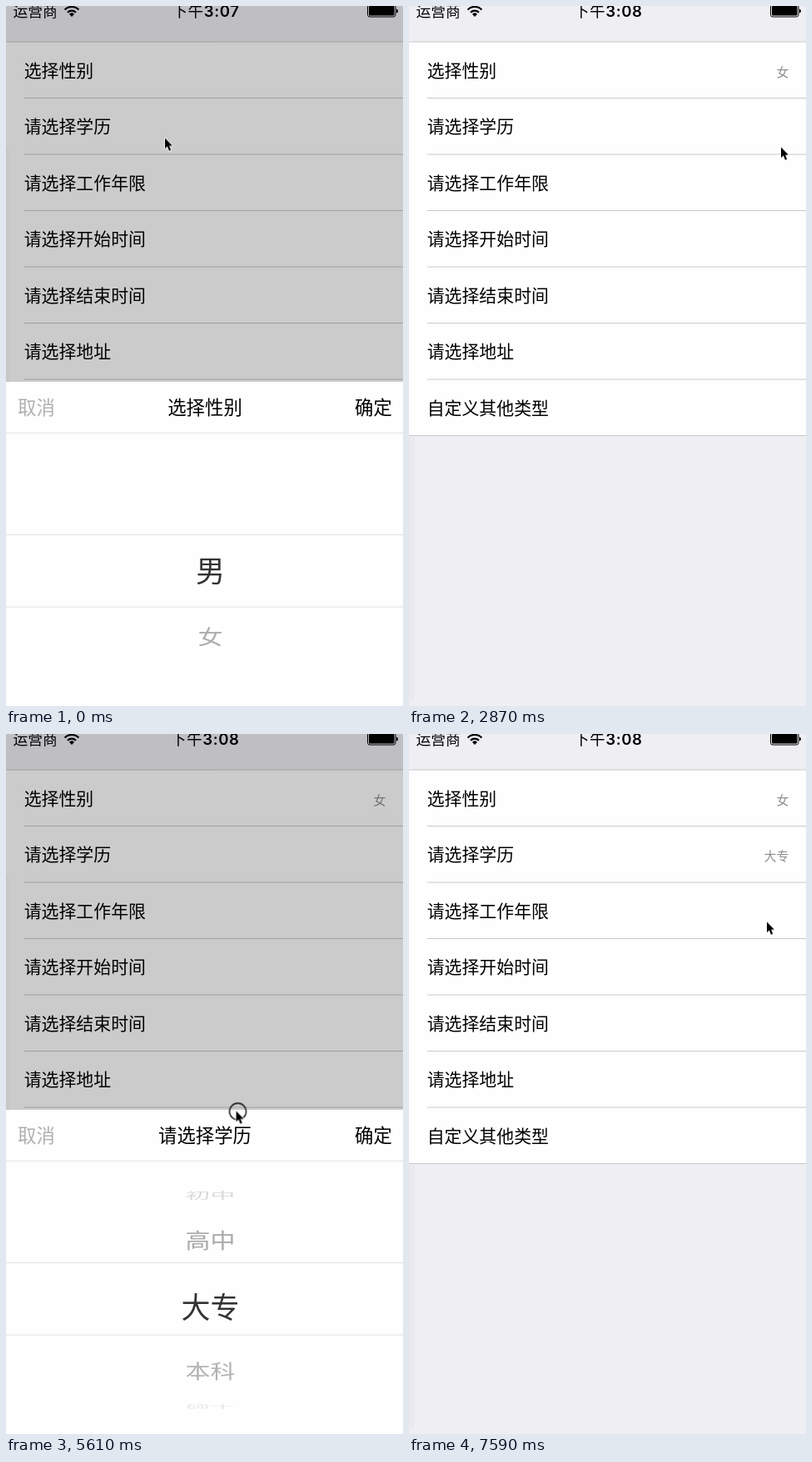
An HTML page that plays this animation: 477 by 840 pixels, repeating every 8 s.

```html
<!DOCTYPE html>
<html lang="zh-CN">
<head>
<meta charset="utf-8">
<title>选择器</title>
<style>
@property --scroll { syntax: "<number>"; inherits: true; initial-value: 0; }

html, body { margin: 0; width: 100%; height: 100%; overflow: hidden; background: #efeef3; }
svg { display: block; width: 100%; height: 100%; }
text { font-family: "Noto Sans CJK SC", "Noto Sans CJK", sans-serif; }
line { stroke: #c8c7cc; }
.status { font-size: 17.8px; }
.clock text { font: 600 18.6px Inter, "Noto Sans CJK SC", sans-serif; letter-spacing: .6px; text-anchor: end; }
.clock tspan { font-weight: 500; }
.row { font-size: 20.9px; }
.value { font-size: 15px; fill: #8e8e93; text-anchor: end; }
.bar { font-size: 22.4px; }
.title { text-anchor: middle; }
.sheet line { stroke: #e2e2e2; }

/* Wheel items sit on a cylinder; --scroll is the index facing the viewer. */
.item {
  --angle: calc((var(--i) - var(--scroll)) * 36.5deg);
  transform: translateY(calc(133px * sin(var(--angle)))) scaleY(max(0, cos(var(--angle))));
  text-anchor: middle;
}
.side .item { font-size: 30px; fill: #9a9a9a; opacity: max(0, cos(var(--angle))); }
.lens .item { font-size: 35px; fill: #333; }

.cursor, .sheet, .dim, .press, .early, .late, .value, .picker { animation: 8s linear infinite; }
.press, .early, .late, .value { animation-timing-function: step-end; }
.cursor { animation-name: cursor; }
.press { animation-name: press; }
.sheet { animation-name: sheet; }
.dim { animation-name: dim; }
.early { animation-name: early; }
.late { animation-name: late; }
.v0 { animation-name: first-value; }
.v1 { animation-name: second-value; }
.p0 { animation-name: spin-gender, before; animation-timing-function: linear, step-end; }
.p1 { animation-name: spin-degree, after; animation-timing-function: linear, step-end; }

@keyframes early { 0% { opacity: 1 } 10%, 100% { opacity: 0 } }
@keyframes late { 0% { opacity: 0 } 10%, 100% { opacity: 1 } }
@keyframes before { 0% { opacity: 1 } 40%, 100% { opacity: 0 } }
@keyframes after { 0% { opacity: 0 } 40%, 100% { opacity: 1 } }
@keyframes first-value { 0% { opacity: 0 } 28.5%, 100% { opacity: 1 } }
@keyframes second-value { 0% { opacity: 0 } 83.4%, 100% { opacity: 1 } }
@keyframes press {
  0%, 16%, 28.4%, 48%, 73.75%, 83.4%, 100% { opacity: 0 }
  5.3%, 26.9%, 47%, 58.5%, 82.4% { opacity: 1 }
}
@keyframes dim {
  0%, 30.375% { opacity: 1 }
  31%, 47% { opacity: 0 }
  48.5%, 86% { opacity: 1 }
  86.75%, 100% { opacity: 0 }
}
@keyframes sheet {
  0%, 28.875% { transform: translateY(0) }
  30.375% { transform: translateY(390px) }
  47.3% { transform: translateY(390px); animation-timing-function: ease-out }
  51.8%, 83.875% { transform: translateY(0) }
  85.25%, 100% { transform: translateY(390px) }
}
@keyframes spin-gender {
  0% { --scroll: 0 }
  5.4% { --scroll: 0; animation-timing-function: ease-in-out }
  15.125% { --scroll: .87 }
  16% { --scroll: .87; animation-timing-function: ease-out }
  18.5%, 100% { --scroll: 1 }
}
@keyframes spin-degree {
  0% { --scroll: 0 }
  58.75% { --scroll: 0; animation-timing-function: cubic-bezier(.3, .2, .5, 1) }
  70.125% { --scroll: 2.88 }
  71.875% { --scroll: 2.92 }
  73.75% { --scroll: 2.92; animation-timing-function: ease-out }
  77%, 100% { --scroll: 3 }
}
@keyframes cursor {
  0%, 1.5% { transform: translate(191px, 158.5px) }
  3% { transform: translate(237px, 630px) }
  5.25% { transform: translate(237px, 630px); animation-timing-function: ease-in-out }
  15.125%, 16% { transform: translate(238px, 538px) }
  19.375%, 21.875% { transform: translate(369px, 537px) }
  26% { transform: translate(418px, 491.5px) }
  26.875%, 28.5% { transform: translate(440px, 482px) }
  31%, 33.25% { transform: translate(379px, 471px) }
  35.875%, 40% { transform: translate(447px, 169.5px) }
  44.375%, 55% { transform: translate(432.5px, 157.5px) }
  58% { transform: translate(262px, 690px) }
  58.75% { transform: translate(262px, 696px); animation-timing-function: cubic-bezier(.3, .2, .5, 1) }
  70.125% { transform: translate(276.5px, 452.5px) }
  71.875%, 75% { transform: translate(277px, 449.5px) }
  82%, 83.875% { transform: translate(450.5px, 485px) }
  85.375%, 86% { transform: translate(448.5px, 369.5px) }
  86.75%, 89% { transform: translate(450px, 302px) }
  94.875%, 100% { transform: translate(430px, 225.5px) }
}
</style>
</head>
<body>
<svg viewBox="0 0 477 840">
  <defs>
    <clipPath id="band"><rect y="635" width="477" height="86"/></clipPath>
    <clipPath id="around"><path d="M0 513H477V634H0zM0 722H477V810H0z"/></clipPath>
  </defs>

  <rect width="477" height="840" fill="#efeef3"/>
  <rect x="-12" y="490" width="19" height="345" rx="8" fill-opacity=".02"/>

  <g class="status">
    <text x="8.5" y="13">运营商</text>
    <g class="clock">
      <text class="early" x="280.6" y="13"><tspan>下午</tspan>3:07</text>
      <text class="late" x="280.6" y="13"><tspan>下午</tspan>3:08</text>
    </g>
    <path d="M79 13l-3-3.2a4.3 4.3 0 0 1 6 0z"/>
    <path d="M74 7.8A7 7 0 0 1 84 7.8M70.6 4.4A11.8 11.8 0 0 1 87.4 4.4" fill="none" stroke="#000" stroke-width="2.2"/>
    <rect x="434.5" y="-1.5" width="33.5" height="14.5" rx="2.5" fill="none" stroke="#000"/>
    <rect x="436" y="0" width="30.5" height="11.5" rx="1"/>
    <path d="M469 3.5q2 .5 2 2.5t-2 2.5z"/>
  </g>

  <g id="table"><rect y="43" width="477" height="472.5" fill="#fefefe"/></g>

  <g class="dim">
    <rect width="477" height="840" fill-opacity=".2"/>
    <rect x="-12" y="168" width="16" height="347" rx="7" fill-opacity=".02"/>
  </g>

  <g class="sheet">
    <rect y="451" width="477" height="389" fill="#fefefe"/>
    <g class="bar">
      <text x="14" y="489.7" fill="#b0b0b0">取消</text>
      <text x="419" y="489.7">确定</text>
    </g>
    <g id="pickers"></g>
    <line x2="477" y1="512.3" y2="512.3"/>
    <line x2="477" y1="634.5" y2="634.5"/>
    <line x2="477" y1="721.2" y2="721.2"/>
  </g>

  <g class="cursor">
    <circle class="press" cx="2" cy=".5" r="10" fill="none" stroke="#000" stroke-width="1.3"/>
    <path d="M0 0V12.8L2.9 10.1 5 15.2 7.2 14.2 5.1 9.3H9z" stroke="#fff" stroke-width="1.6" stroke-linejoin="round" paint-order="stroke"/>
  </g>
</svg>
<script>
const rows = ["选择性别", "请选择学历", "请选择工作年限", "请选择开始时间", "请选择结束时间", "请选择地址", "自定义其他类型"];
const values = ["女", "大专"];
const pickers = [
  { title: rows[0], items: ["男", "女"] },
  { title: rows[1], items: ["小学", "初中", "高中", "大专", "本科", "硕士", "博士"] }
];
const rowHeight = 67.5;

const add = (id, markup) => document.getElementById(id).insertAdjacentHTML("beforeend", markup);

const lineAt = i => {
  const y = 43 + rowHeight * i;
  const inset = i % rows.length ? 22 : 0;
  return `<line x1="${inset}" x2="477" y1="${y}" y2="${y}"/>`;
};

const wheel = (kind, clip, items) => `
  <g class="${kind}" clip-path="url(#${clip})"><g transform="translate(245.5 677.6)">
    ${items.map((name, i) => `<text class="item" style="--i:${i}" dy=".38em">${name}</text>`).join("")}
  </g></g>`;

rows.forEach((name, i) => add("table",
  `${lineAt(i)}<text class="row" x="21.7" y="${84.7 + rowHeight * i}">${name}</text>`));
add("table", lineAt(rows.length));
values.forEach((name, i) => add("table",
  `<text class="value v${i}" x="456.5" y="${84.7 + rowHeight * i}">${name}</text>`));

pickers.forEach(({ title, items }, i) => add("pickers", `
  <g class="picker p${i}">
    <text class="bar title" x="239" y="489.7">${title}</text>
    ${wheel("side", "around", items)}
    ${wheel("lens", "band", items)}
  </g>`));
</script>
</body>
</html>
```
